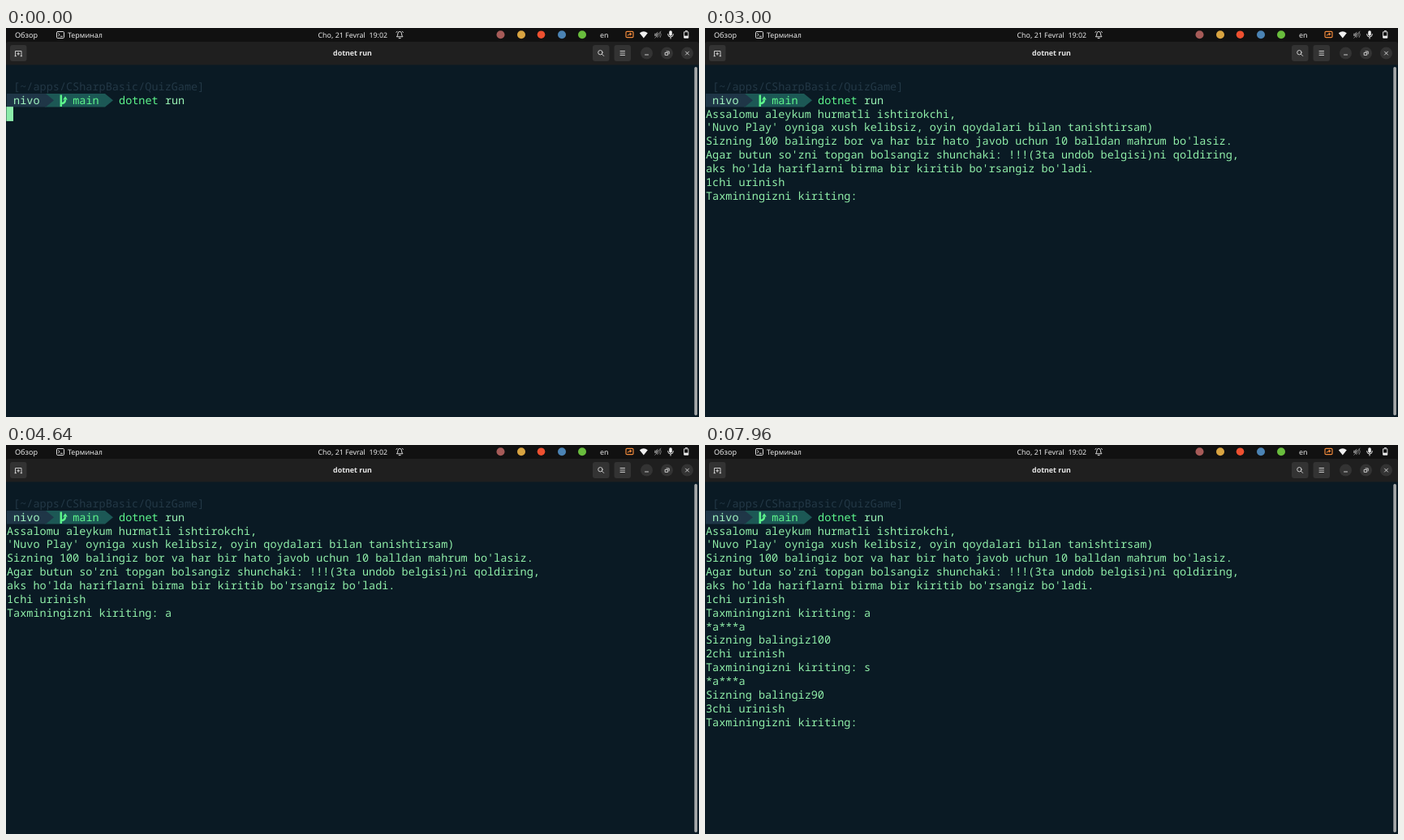
Recreate the animation shown at these times as an HTML page. Size 854 px wide and 480 px high, loop 8 s.

```html
<!DOCTYPE html>
<html lang="uz">
<head>
<meta charset="utf-8">
<title>Terminal</title>
<style>
  html, body { margin: 0; width: 100%; height: 100%; overflow: hidden; background: #111; }
  svg { display: block; width: 854px; height: 480px; }
  text { white-space: pre; text-rendering: geometricPrecision; }
  .mono { font: 13.53px "Roboto Mono", "Noto Sans Mono", "DejaVu Sans Mono", monospace; fill: #90efa9; }
  .bar { font: 500 8.9px "Noto Sans", "Open Sans", sans-serif; fill: #e8e8e8; }
  .line { fill: none; stroke: #dcdcdc; stroke-linecap: round; stroke-linejoin: round; }
</style>
</head>
<body>
<svg viewBox="0 0 854 480">
  <rect width="854" height="480" fill="#111"/>

  <!-- top panel -->
  <g class="bar">
    <text x="11" y="11.6" font-size="9.1">Обзор</text>
    <text x="76" y="11.6">Терминал</text>
    <text x="384.5" y="11.6">Cho, 21 Fevral  19:02</text>
    <text x="732" y="11.6">en</text>
  </g>
  <g class="line" stroke-width="1">
    <rect x="62.5" y="4.5" width="9" height="8" rx="1.2"/>
    <path d="M64.5 6.8l1.7 1.5-1.7 1.5M67.5 10.3h2"/>
    <path d="M481.7 10.5q1.2-1 1.2-3.6a2.3 2.5 0 0 1 4.6 0q0 2.6 1.2 3.6zM484.2 12.6h2M482 4.2l-1 1.2M488.4 4.2l1 1.2"/>
  </g>
  <circle cx="609.5" cy="8.2" r="5" fill="#a65b58"/>
  <circle cx="635" cy="8.2" r="5" fill="#d9a441"/>
  <circle cx="659.5" cy="8.2" r="4.8" fill="#ee5030"/>
  <circle cx="685" cy="8.2" r="5" fill="#4b83b4"/>
  <circle cx="710" cy="8.2" r="5" fill="#69bd3d"/>

  <g fill="none" stroke="#f08a3c" stroke-width="1.2">
    <rect x="764" y="4.4" width="9" height="7.2" rx="1.2"/>
    <path d="M766.3 9.5q.3-2 3.7-2M768.7 6l1.8 1.5-1.8 1.5"/>
  </g>
  <path d="M780.8 6.2q5-3.8 10 0l-5 6.3z" fill="#f0f0f0"/>
  <g fill="#777">
    <path d="M799 6.8h1.8l2.5-2.4v8l-2.5-2.4h-1.8z"/>
    <path d="M804.5 6q1.5 2.3 0 4.6M806 4.7q2.6 3.6 0 7.2M799.5 12.6l7.8-8.8" fill="none" stroke="#777"/>
  </g>
  <rect x="817.2" y="3.3" width="3.6" height="6.4" rx="1.8" fill="#eee"/>
  <path class="line" d="M815.6 7.5q0 3.6 3.4 3.6t3.4-3.6M819 11.2v1.9" stroke-width="1"/>
  <path class="line" d="M836 4.8h4.8v7.4H836zM837.4 3.6h2" stroke-width="1"/>
  <rect x="836" y="9.6" width="4.8" height="2.6" fill="#eee"/>

  <!-- window header -->
  <path d="M0 46V20q0-3 3-3h848q3 0 3 3v26z" fill="#1f1f1f"/>
  <g fill="#333">
    <rect x="5" y="21" width="20.5" height="20" rx="3"/>
    <rect x="723" y="21" width="20.5" height="20" rx="3"/>
    <rect x="749.5" y="21" width="20.5" height="20" rx="3"/>
    <circle cx="789.5" cy="31" r="7.5"/>
    <circle cx="814.5" cy="31" r="7.5"/>
    <circle cx="839.5" cy="31" r="7.5"/>
  </g>
  <g class="line" stroke-width=".9">
    <path d="M11.5 34.5v-6h7.5v6M11 34.7h1.6M18 34.7h1.6M15.2 30.3v3M13.7 31.8h3"/>
    <circle cx="732.4" cy="30.2" r="2.7"/>
    <path d="M734.5 32.3l2.2 2.2M757 28.5h5.5M757 31h5.5M757 33.5h5.5"/>
    <path d="M787.5 33h4M812.5 30.4h3.2v3h-3.2zM814 28.9h3.2v3M837.5 29.1l4 4M841.5 29.1l-4 4"/>
  </g>
  <text class="bar" x="427" y="34.2" text-anchor="middle" style="font-weight:700">dotnet run</text>

  <!-- terminal -->
  <rect y="45.5" width="854" height="434.5" fill="#0a1a24"/>
  <rect x="848.3" y="48" width="3.6" height="430" rx="1.8" fill="#a6a9aa"/>
  <path d="M48 81h74l10 8.3-10 8.3H48z" fill="#1c5855"/>
  <path d="M1 81h48l10 8.3-10 8.3H1z" fill="#1f3647"/>
  <path d="M67.8 82.5v14.5M67.8 93.2q5.2-.6 5.2-4.8" fill="none" stroke="#5df58c" stroke-width="2.5"/>
  <path d="M70.2 88.6h5.6l-2.8-4.4z" fill="#5df58c"/>
  <g id="prompt"></g>
  <g id="output"></g>
  <rect id="cursor" width="8.6" height="17.8" fill="#8cecaa"/>
</svg>
<script>
const LOOP = 8000, BLINK = 600;
const COL = 8.12, ROW = 16.86, LEFT = 1, BASE = 76.8;
const ASK = "Taxminingizni kiriting: ";

const $ = id => document.getElementById(id);

function put(parent, row, col, str, fill) {
  const el = document.createElementNS("http://www.w3.org/2000/svg", "text");
  el.setAttribute("class", "mono");
  el.setAttribute("x", LEFT + col * COL);
  el.setAttribute("y", BASE + row * ROW);
  if (fill) el.style.fill = fill;
  el.textContent = str;
  parent.append(el);
  return el;
}

const prompt = $("prompt");
put(prompt, 0, 1, "[~/apps/CSharpBasic/QuizGame]", "#233846");
put(prompt, 1, 1, "nivo", "#a0f3bf");
put(prompt, 1, 10, "main", "#5df58c");
put(prompt, 1, 17, "dotnet", "#5df58c");
put(prompt, 1, 24, "run", "#9af4b6");

// [time, first row, lines]
const blocks = [
  [2960, 2, [
    "Assalomu aleykum hurmatli ishtirokchi,",
    "'Nuvo Play' oyniga xush kelibsiz, oyin qoydalari bilan tanishtirsam)",
    "Sizning 100 balingiz bor va har bir hato javob uchun 10 balldan mahrum bo'lasiz.",
    "Agar butun so'zni topgan bolsangiz shunchaki: !!!(3ta undob belgisi)ni qoldiring,",
    "aks ho'lda hariflarni birma bir kiritib bo'rsangiz bo'ladi.",
    "1chi urinish", ASK]],
  [4840, 9, ["*a***a", "Sizning balingiz100", "2chi urinish", ASK]],
  [6840, 13, ["*a***a", "Sizning balingiz90", "3chi urinish", ASK]]
];
const typed = [[3640, 8, "a"], [6120, 12, "s"]];

const shown = [];
for (const [at, row, lines] of blocks)
  lines.forEach((s, i) => shown.push([at, put($("output"), row + i, 0, s)]));
for (const [at, row, key] of typed)
  shown.push([at, put($("output"), row, ASK.length, key)]);

// [time, row, column, start of the blink cycle]
const stops = [
  [0, 2, 0, -80],
  [2960, 8, 24, -80],
  [3640, 8, 25, 3640],
  [4840, 12, 24, 4840],
  [6120, 12, 25, 6120],
  [6840, 16, 24, 6840]
];

function draw(t) {
  for (const [at, el] of shown) el.style.display = t >= at ? "" : "none";
  const [, row, col, phase] = stops.findLast(s => t >= s[0]);
  const cursor = $("cursor");
  cursor.setAttribute("x", LEFT + col * COL - 0.6);
  cursor.setAttribute("y", BASE + row * ROW - 13.4);
  cursor.style.display = Math.floor((t - phase) / BLINK) % 2 ? "none" : "";
}

const start = performance.now();
function tick() {
  draw((performance.now() - start) % LOOP);
  requestAnimationFrame(tick);
}
tick();
</script>
</body>
</html>
```
